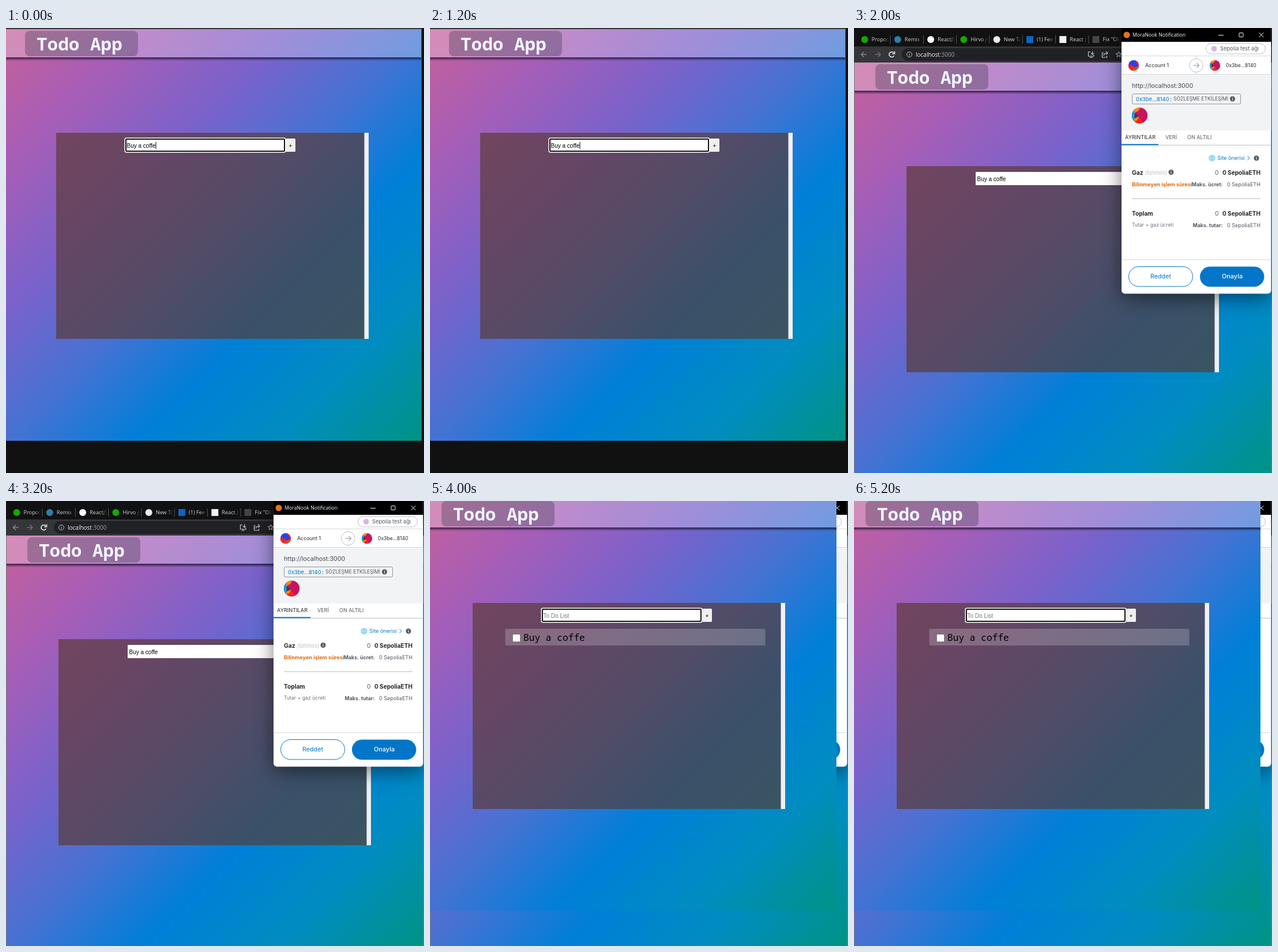
An HTML page with a canvas that plays this animation: 725 by 773 pixels, repeating every 6 s.

```html
<!DOCTYPE html>
<html lang="en">
<head>
<meta charset="utf-8">
<title>Todo App</title>
<style>
html, body { margin: 0; width: 100%; height: 100%; overflow: hidden; background: #111; }
canvas { display: block; }
</style>
</head>
<body>
<canvas id="stage" width="725" height="773"></canvas>
<script>
const ctx = document.getElementById('stage').getContext('2d');
const PAGE_W = 723, PAGE_H = 715;
const INTER = 'Inter, sans-serif', SANS = '"Open Sans", sans-serif';
const ARIAL = '"Liberation Sans", Arial, sans-serif', MONO = '"Noto Sans Mono", monospace';
const BLUE = '#0376c9', GREY = '#535a61', INK = '#24272a', LINE = '#bbc0c5';

function rect(x, y, w, h, color) {
  ctx.fillStyle = color;
  ctx.fillRect(x, y, w, h);
}
function round(x, y, w, h, r, fill, stroke) {
  ctx.beginPath();
  ctx.roundRect(x, y, w, h, r);
  paint(fill, stroke);
}
function paint(fill, stroke, width = 1) {
  if (fill) { ctx.fillStyle = fill; ctx.fill(); }
  if (stroke) { ctx.strokeStyle = stroke; ctx.lineWidth = width; ctx.stroke(); }
}
function circle(x, y, r, fill, stroke) {
  ctx.beginPath();
  ctx.arc(x, y, r, 0, Math.PI * 2);
  paint(fill, stroke);
}
function path(points, stroke, width = 1) {
  ctx.beginPath();
  points.forEach(([x, y]) => ctx.lineTo(x, y));
  paint(null, stroke, width);
}
function text(str, x, y, size, color, style = '', family = INTER, align = 'left') {
  ctx.font = `${style} ${size}px ${family}`;
  ctx.textAlign = align;
  ctx.fillStyle = color;
  ctx.fillText(str, x, y);
}
function clipped(x, y, w, h, draw) {
  ctx.save();
  ctx.beginPath();
  ctx.rect(x, y, w, h);
  ctx.clip();
  draw();
  ctx.restore();
}
function fade(x0, y0, x1, y1, stops) {
  const g = ctx.createLinearGradient(x0, y0, x1, y1);
  stops.forEach(([at, color]) => g.addColorStop(at, color));
  return g;
}

function todoPage(left, top, { value, hint, focus, caret, item }) {
  ctx.save();
  ctx.translate(left, top);
  const end = (PAGE_W + PAGE_H) / 2;
  rect(0, 0, PAGE_W, PAGE_H, fade(0, 0, end, end, [
    [0, '#c6609a'], [.17, '#a65eb7'], [.345, '#7a62cb'], [.5, '#4672d3'],
    [.655, '#007fd8'], [.83, '#008dbf'], [1, '#009384']
  ]));

  rect(0, 49, PAGE_W, 6, fade(0, 49, 0, 55, [[0, 'rgba(15,10,35,.8)'], [.4, 'rgba(15,10,35,.45)'], [1, 'rgba(15,10,35,0)']]));
  rect(0, 0, PAGE_W, 49, 'rgba(255,255,255,.28)');
  round(36, 3, 196, 44, 8, 'rgba(40,40,60,.3)');
  text('Todo App', 56, 37, 31, '#f0f4ff', 'bold', MONO);

  rect(90, 180, 535, 358, 'rgba(89,56,47,.65)');
  rect(624.5, 180, 7.5, 358, '#f0f0f0');

  if (focus) {
    round(208.5, 188.5, 280, 26, 3, '#fff');
    round(210, 190, 277, 23, 2, '#101010');
    rect(212, 192, 273, 19, '#fff');
  } else {
    rect(210, 190, 277, 23, '#fff');
  }
  text(value || hint, 212.5, 205.5, 10, value ? '#000' : '#757575', '', ARIAL);
  if (caret) rect(262.5, 196, 1, 12, '#000');
  round(488, 190, 17, 23, 1.5, '#efefef');
  text('+', 496.5, 205.5, 10, '#000', '', ARIAL, 'center');

  if (item) {
    rect(146.5, 225, 451, 29, 'rgba(255,255,255,.2)');
    round(159.5, 234.5, 13, 13, 2, '#fff', '#858585');
    text(item, 178, 246, 16.2, '#000', '', MONO);
  }
  ctx.restore();
}

function tab(i, label, color, square) {
  const x = 12.5 + i * 57.3;
  if (square) rect(x, 14, 12, 12, color);
  else circle(x + 6, 20, 6, color);
  clipped(x + 18, 8, 30, 24, () => text(label, x + 18, 23, 9.2, '#d5d7da', '', SANS));
  rect(x + 38, 8, 11, 24, fade(x + 38, 0, x + 48, 0, [[0, 'rgba(17,17,17,0)'], [1, '#111']]));
  rect(x + 50, 13, 1, 14, '#55575b');
}

function browserBar() {
  rect(0, 0, 725, 32, '#111');
  [['Proposals', '#14a800'], ['Remix - Eth', '#2a7fa8'], ['ReactJS', '#fff'], ['Hirvo job', '#14a800'],
   ['New Tab', '#e8eaed'], ['(1) Feed', '#0a66c2', 1], ['React JS', '#f2f2f2', 1], ['Fix "Old', '#444', 1]
  ].forEach((t, i) => tab(i, ...t));

  rect(0, 32, 725, 28, '#35363a');
  round(83, 35, 500, 22, 11, '#202124');
  path([[22, 46], [12.5, 46]], '#8c8f93', 1.3);
  path([[17, 41.5], [12.5, 46], [17, 50.5]], '#8c8f93', 1.3);
  path([[36.5, 46], [46, 46]], '#77797d', 1.3);
  path([[41.5, 41.5], [46, 46], [41.5, 50.5]], '#77797d', 1.3);
  ctx.beginPath();
  ctx.arc(65.5, 46, 4.5, .5, 5.6);
  paint(null, '#f1f3f4', 1.5);
  path([[70.5, 40.5], [70.5, 44.7], [66.3, 44.7]], '#f1f3f4', 1.5);
  circle(96, 46, 4.5, null, '#c3c6ca');
  rect(95.5, 45, 1, 3.5, '#c3c6ca');
  rect(95.5, 43, 1, 1, '#c3c6ca');
  text('localhost', 107, 49.7, 10, '#f1f3f4', '', SANS);
  const hostWidth = ctx.measureText('localhost').width;
  text(':3000', 107 + hostWidth, 49.7, 10, '#9aa0a6', '', SANS);

  const icon = '#c3c6ca';
  path([[410, 41.5], [406.5, 41.5], [406.5, 49], [416, 49], [416, 46.5]], icon, 1.2);
  path([[408.5, 51], [414, 51]], icon, 1.2);
  path([[413.5, 40.5], [413.5, 46]], icon, 1.2);
  path([[411, 43.7], [413.5, 46.2], [416, 43.7]], icon, 1.2);
  path([[433, 43], [430.5, 43], [430.5, 51], [438.5, 51], [438.5, 48.5]], icon, 1.2);
  path([[433, 48], [434, 45], [440, 43.5]], icon, 1.2);
  path([[437, 40.8], [440, 43.5], [437, 46.2]], icon, 1.2);
  const star = Array.from({ length: 11 }, (_, i) => {
    const a = i * Math.PI / 5 - Math.PI / 2, r = i % 2 ? 2.2 : 5;
    return [459 + r * Math.cos(a), 46 + r * Math.sin(a)];
  });
  path(star, icon, 1);
}

function avatar(x, y, r, base, wedges) {
  ctx.save();
  circle(x, y, r, base);
  ctx.clip();
  ctx.translate(x, y);
  ctx.scale(r, r);
  for (const [color, ...points] of wedges) {
    ctx.beginPath();
    points.forEach(([px, py]) => ctx.lineTo(px, py));
    paint(color);
  }
  ctx.restore();
}
const ACCOUNT = [
  ['#f3212f', [-1, -.3], [.1, .2], [-.1, 1], [-1, 1]],
  ['#f3212f', [.2, -1], [1, -1], [1, .3]],
  ['#e8470c', [-.1, .5], [1, .1], [1, 1], [-.3, 1]]
];
const CONTRACT = [
  ['#189fd6', [-1, -1], [-.5, -1], [-.6, 1], [-1, 1]],
  ['#f58a12', [-.75, -1], [.1, -1], [-.2, -.55], [-.65, -.35]],
  ['#5b2a66', [-.65, -.35], [-.05, .1], [-.65, .5]],
  ['#f3251c', [-.7, .45], [-.1, .15], [.5, 1], [-.5, 1]],
  ['#f58a12', [-.7, .4], [-.05, .1], [-.3, .6], [-.7, .75]]
];

function info(x, y) {
  circle(x, y, 4.5, GREY);
  rect(x - .6, y - .6, 1.2, 3, '#fff');
  rect(x - .6, y - 2.6, 1.2, 1.2, '#fff');
}

function amountRows(y, limit) {
  text('0', 632.5, y, 10.3, GREY, '', INTER, 'right');
  text('0 SepoliaETH', 705, y, 10.1, INK, 'bold', INTER, 'right');
  text(limit, 639.5, y + 19.5, 8.8, GREY, 'bold', INTER, 'right');
  text('0 SepoliaETH', 705, y + 19.5, 9.1, GREY, '', INTER, 'right');
}

function walletPopup() {
  ctx.save();
  ctx.shadowColor = 'rgba(0,0,0,.5)';
  ctx.shadowBlur = 34;
  ctx.shadowOffsetY = 8;
  round(464, 0, 259.5, 461.5, [0, 0, 6, 6], '#fff');
  ctx.restore();

  rect(464, 0, 259.5, 24, '#000');
  circle(473, 12, 5.5, '#e2761b');
  text('MoraNook Notification', 483, 15, 8.7, '#fff', '', SANS);
  path([[632, 12.5], [641, 12.5]], '#fff');
  round(668, 8.5, 7, 7, 1, null, '#fff');
  path([[702.5, 8], [710.5, 16]], '#fff');
  path([[710.5, 8], [702.5, 16]], '#fff');

  round(610.5, 27, 103, 18, 9, '#fff', LINE);
  circle(624.7, 36, 4.8, '#d9b3e2');
  text('Sepolia test ağı', 635, 39, 9.3, GREY);

  rect(464, 48, 259.5, 1, '#d6d9dc');
  avatar(485, 65, 9.2, '#2444e4', ACCOUNT);
  text('Account 1', 505, 67.5, 8.9, INK);
  path([[593.5, 48], [593.5, 80]], '#d6d9dc');
  circle(593.5, 65, 11.7, '#fff', LINE);
  path([[588.5, 65], [598, 65]], '#9fa6ae', 1.3);
  path([[594.5, 61], [598.5, 65], [594.5, 69]], '#9fa6ae', 1.3);
  avatar(626, 65, 9.2, '#c8145f', CONTRACT);
  text('0x3be...8140', 645, 67.5, 8.6, INK);

  rect(464, 80, 259.5, 98, '#f2f3f5');
  rect(464, 80, 259.5, 1, '#d6d9dc');
  text('http://localhost:3000', 482, 103.5, 10.7, '#42474d');
  round(482.5, 114.5, 188, 17.5, 2, null, '#8d949b');
  text('0x3be...8140', 489, 126.5, 9.4, BLUE);
  text(':', 548, 126.5, 9.4, INK);
  text('SÖZLEŞME ETKİLEŞİMİ', 554, 126.3, 8.6, GREY);
  info(656.5, 123);
  avatar(495.5, 152, 13.7, '#c8145f', CONTRACT);

  text('AYRINTILAR', 470, 193, 9.2, INK);
  text('VERİ', 540, 193, 9.2, GREY);
  text('ON ALTILI', 578, 193, 9, GREY);
  rect(464, 203, 259.5, 1, LINE);
  rect(464, 201.5, 64, 2, BLUE);

  circle(621, 226, 5.8, '#8fd0f5');
  ctx.beginPath();
  ctx.ellipse(621, 226, 2.6, 5.8, 0, 0, Math.PI * 2);
  paint(null, '#d9effb', .8);
  path([[615.5, 226], [626.5, 226]], '#d9effb', .8);
  text('Site önerisi', 630.5, 229, 9, BLUE);
  path([[682.5, 222.5], [686, 226], [682.5, 229.5]], BLUE);
  info(698, 226);

  text('Gaz', 482, 255, 10.4, INK, 'bold');
  text('(tahmini)', 504.5, 255, 9.3, LINE, 'italic');
  info(550, 250.5);
  amountRows(255, 'Maks. ücret:');
  text('Bilinmeyen işlem süresi', 482, 274.5, 9.1, '#e06a10', 'bold');
  rect(482, 296, 223, 1, LINE);
  text('Toplam', 482, 326, 10.2, INK, 'bold');
  amountRows(326, 'Maks. tutar:');
  text('Tutar + gaz ücreti', 482, 345, 8.7, '#6a737d');

  rect(464, 402, 259.5, 1, '#d6d9dc');
  round(476.5, 414.5, 111, 34.5, 17.2, '#fff', BLUE);
  text('Reddet', 532, 434.5, 10.7, BLUE, '', INTER, 'center');
  round(600, 414.5, 111.5, 35, 17.5, BLUE);
  text('Onayla', 656, 434.5, 10.9, '#fff', '500', INTER, 'center');
}

function typingScene() {
  rect(0, 0, 725, 773, '#111');
  rect(0, 0, 721, 2, '#35363a');
  rect(720, 0, 1, 717, '#55575b');
  todoPage(-3, 2, { value: 'Buy a coffe', focus: true, caret: true });
}
function confirmScene() {
  rect(0, 0, 725, 773, '#77797c');
  todoPage(1, 60, { value: 'Buy a coffe' });
  browserBar();
  walletPopup();
}
function addedScene() {
  confirmScene();
  clipped(0, 0, 705, 711, () =>
    todoPage(-16, -3, { hint: 'To Do List', focus: true, item: 'Buy a coffe' }));
}

const scenes = [typingScene, confirmScene, addedScene];
const SCENE_MS = 2000;
const start = performance.now();

function tick() {
  const elapsed = Math.max(0, performance.now() - start);
  scenes[Math.floor(elapsed / SCENE_MS) % scenes.length]();
  requestAnimationFrame(tick);
}
tick();
</script>
</body>
</html>
```
